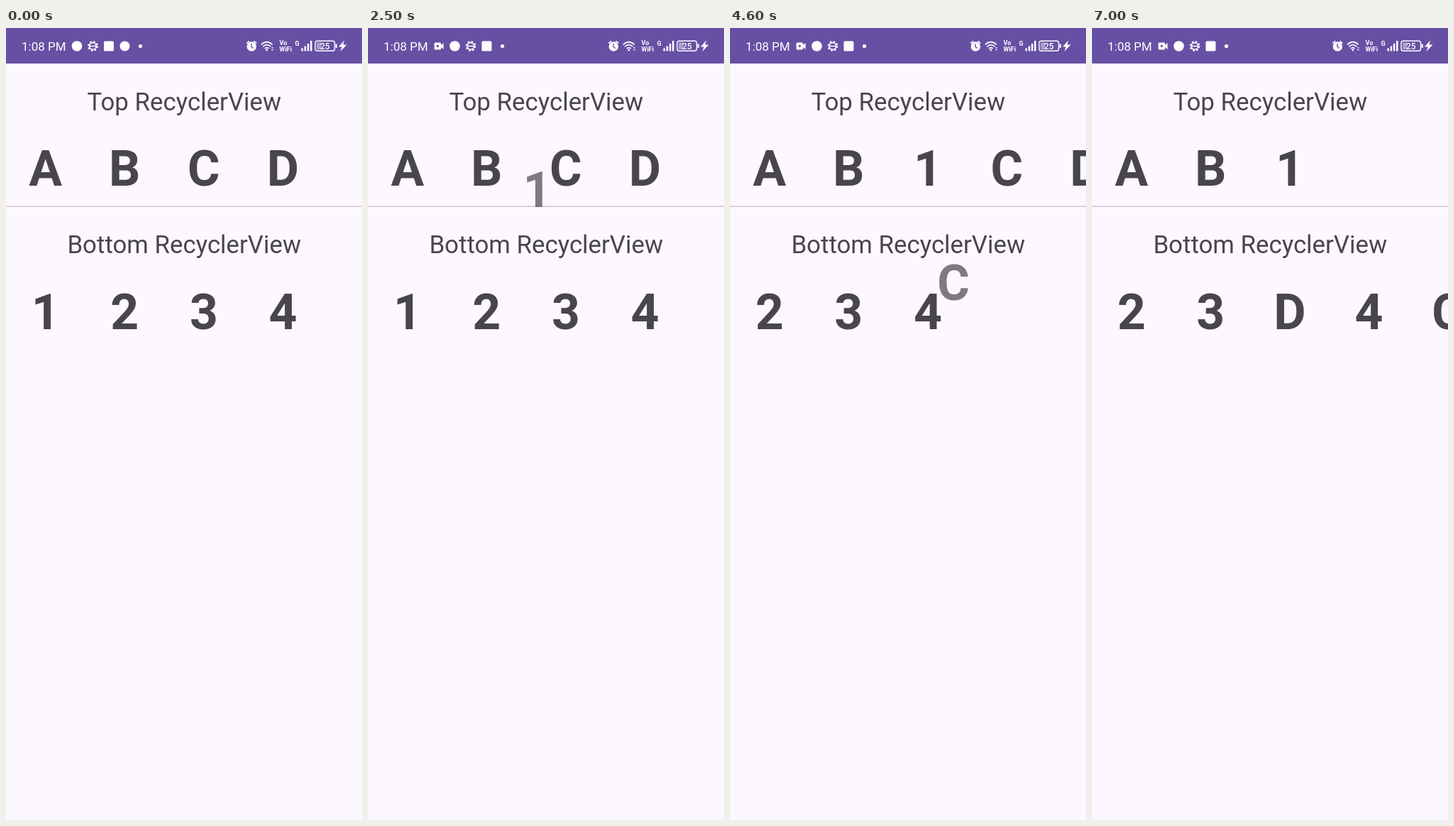
An HTML page for the animation above (8 s loop, 502 px wide and 1115 px high).

```html
<!DOCTYPE html>
<html lang="en">
<head>
<meta charset="utf-8">
<title>Drag between lists</title>
<style>
  html, body { margin: 0; width: 100%; height: 100%; overflow: hidden; background: #fdf7ff; }
  svg { display: block; width: 502px; height: 1115px; font-family: Roboto, sans-serif; }
  .title { font-size: 34.85px; fill: #49454f; text-anchor: middle; }
  .item { font-size: 69.7px; font-weight: 700; fill: #49454f; text-anchor: middle; }
  .status { fill: #fff; }
  .line { fill: none; stroke: #fff; }
</style>
</head>
<body>
<svg viewBox="0 0 502 1115">
  <rect width="502" height="1115" fill="#fdf7ff"/>
  <rect width="502" height="50" fill="#6750a4"/>

  <g class="status">
    <text x="22" y="32" font-size="17">1:08 PM</text>
    <g id="camera">
      <rect x="93.5" y="20.5" width="9.5" height="10" rx="1.5"/>
      <path d="M102.500 24.500L106.500 21V30L102.500 26.500Z"/>
      <circle cx="98.300" cy="25.500" r="1.700" fill="#6750a4"/>
    </g>
    <g id="notices">
      <circle cx="100" cy="25.500" r="7.300"/>
      <g class="line">
        <circle cx="122.500" cy="25.500" r="4.800" stroke-width="1.700"/>
        <circle cx="122.500" cy="25.500" r="6.500" stroke-width="1.800" stroke-dasharray="2.550"/>
        <path d="M118 25.500H127" stroke-width="1.500"/>
      </g>
      <rect x="138" y="18.500" width="14" height="14" rx="1.500"/>
    </g>
    <circle id="oldest" cx="167.500" cy="25.500" r="7"/>
    <circle cx="189.500" cy="25.500" r="2.600"/>

    <circle cx="346.300" cy="26" r="6.700"/>
    <path class="line" d="M339.300 21.500L343.200 18.300M353.300 21.500L349.400 18.300" stroke-width="1.700"/>
    <path d="M346 22V26.500L349 28.500" fill="none" stroke="#6750a4" stroke-width="1.400"/>

    <g class="line" stroke-width="1.700">
      <path d="M359.800 23.500Q367.800 15.800 375.800 23.500"/>
      <path d="M362.300 26.300Q367.800 21 373.300 26.300"/>
      <path d="M364.800 29Q367.800 26.200 370.800 29"/>
    </g>
    <circle cx="367.800" cy="31" r="1.400"/>
    <path d="M374 28.500L375.500 26.500L377 28.500ZM374 30L375.500 32L377 30Z"/>

    <g font-weight="700">
      <text x="385.500" y="24" font-size="9">Vo</text>
      <text x="385.500" y="32.500" font-size="9">WiFi</text>
      <text x="407.500" y="24.500" font-size="9">G</text>
    </g>
    <path d="M416.500 28.500h2.500v4h-2.500zM420.700 25.500h2.500v7h-2.500zM424.900 22h2.500v10.500h-2.500zM429 18h2.500v14.500h-2.500z"/>

    <rect class="line" x="436" y="18.200" width="27.500" height="14" rx="3" stroke-width="1.400"/>
    <rect x="438" y="20.200" width="6.500" height="10" rx="1" opacity=".45"/>
    <path d="M464.600 22.500h1.200q1 0 1 1v3.400q0 1-1 1h-1.200z"/>
    <text x="449.800" y="29.600" font-size="12" font-weight="500" text-anchor="middle">25</text>
    <path d="M477 17.500L469 26.500H473.700L471.500 33L480.500 23.500H475.500Z"/>
  </g>

  <text class="title" x="251.300" y="115.500">Top RecyclerView</text>
  <text class="title" x="251.300" y="317">Bottom RecyclerView</text>
  <rect y="250.500" width="502" height="1.300" fill="#c5bec8"/>
  <g id="items"></g>
</svg>

<script>
const LOOP = 8000, STEP = 100, PITCH = 111.55;
const TOP = 222.3, BOTTOM = 423.8;
const DROP1 = 2630, SWAP = 6000, DROP2 = 6430;
const REMOVE = 120, MOVE = 250;

// moves: [start, duration, slot]; fades: [start, duration, opacity]
const items = [
  { label: 'A', y: TOP, slot: 0 },
  { label: 'B', y: TOP, slot: 1 },
  { label: '1', y: TOP, slot: 2, alpha: 0, fades: [[DROP1 + MOVE, REMOVE, 1]] },
  { label: 'C', y: TOP, slot: 2, moves: [[DROP1, MOVE, 3]], fades: [[SWAP, 0, 0]] },
  { label: 'D', y: TOP, slot: 3, moves: [[DROP1, MOVE, 4], [SWAP, 0, 3]], fades: [[DROP2, REMOVE, 0]] },
  { label: '1', y: BOTTOM, slot: 0, fades: [[DROP1, REMOVE, 0]] },
  { label: '2', y: BOTTOM, slot: 1, moves: [[DROP1 + REMOVE, MOVE, 0]] },
  { label: '3', y: BOTTOM, slot: 2, moves: [[DROP1 + REMOVE, MOVE, 1]] },
  { label: '4', y: BOTTOM, slot: 3, moves: [[DROP1 + REMOVE, MOVE, 2], [DROP2, MOVE, 3]] },
  { label: 'C', y: BOTTOM, slot: 3, alpha: 0, moves: [[DROP2, MOVE, 4]], fades: [[SWAP, 0, 1]] },
  { label: 'D', y: BOTTOM, slot: 2, alpha: 0, fades: [[DROP2 + MOVE, REMOVE, 1]] }
];

// path points: [time, x, baseline]
const drags = [
  { label: '1', end: DROP1, path: [[1800, 53, 412], [2000, 76, 386], [2200, 136, 322], [2400, 212, 264], [2500, 238.500, 252], [2600, 245, 248]] },
  { label: 'C', end: 5200, path: [[4300, 391, 208], [4400, 370, 262], [4500, 338, 322], [4600, 315, 382.500], [4700, 316, 400], [4900, 346, 411], [5100, 376, 414]] },
  { label: 'D', end: DROP2, path: [[6200, 380, 270], [6300, 325, 390], [6400, 290, 437]] }
];

const $ = id => document.getElementById(id);
const mix = (a, b, k) => a + (b - a) * k;
const ease = k => 0.5 - Math.cos(Math.PI * k) / 2;

function progress(t, start, length) {
  if (t < start) return 0;
  return length ? Math.min(1, (t - start) / length) : 1;
}

function follow(t, value, changes = []) {
  for (const [start, length, to] of changes) value = mix(value, to, ease(progress(t, start, length)));
  return value;
}

function along(t, path) {
  let [, x, y] = path[0];
  for (let i = 1; i < path.length; i++) {
    const [from] = path[i - 1], [to, px, py] = path[i];
    const k = progress(t, from, to - from);
    x = mix(x, px, k);
    y = mix(y, py, k);
  }
  return [x, y];
}

function addText(label) {
  const el = document.createElementNS('http://www.w3.org/2000/svg', 'text');
  el.setAttribute('class', 'item');
  el.textContent = label;
  $('items').append(el);
  return el;
}

function place(el, x, y, alpha) {
  el.setAttribute('x', x);
  el.setAttribute('y', y);
  el.setAttribute('opacity', alpha);
}

for (const part of [...items, ...drags]) part.el = addText(part.label);

function render(t) {
  for (const { el, y, slot, alpha = 1, moves, fades } of items) {
    place(el, (follow(t, slot, moves) + 0.5) * PITCH, y, follow(t, alpha, fades));
  }
  for (const { el, path, end } of drags) {
    place(el, ...along(t, path), t >= path[0][0] && t < end ? 0.7 : 0);
  }
  const k = ease(progress(t, 100, 400));
  $('notices').setAttribute('transform', `translate(${22.4 * k} 0)`);
  $('camera').setAttribute('opacity', k);
  $('oldest').setAttribute('opacity', 1 - k);
}

const origin = performance.now();
function tick() {
  const t = (performance.now() - origin) % LOOP;
  render(Math.floor(t / STEP) * STEP);
  requestAnimationFrame(tick);
}
tick();
</script>
</body>
</html>
```
